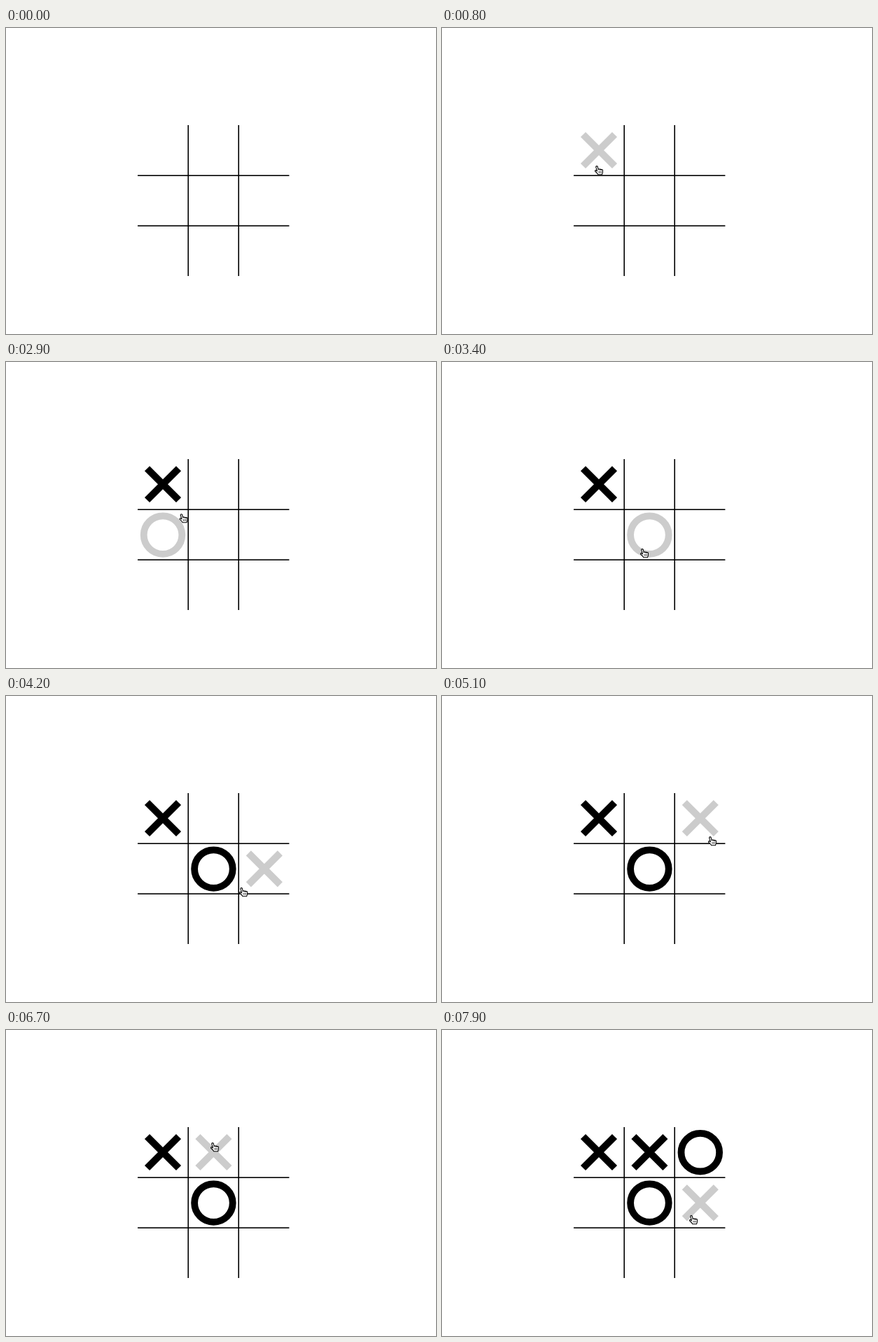
Recreate the animation shown at these times as an HTML page with a canvas. Size 614 by 438 pixels, loop 8000 ms.

```html
<!DOCTYPE html>
<html lang="en">
<head>
<meta charset="utf-8">
<title>Noughts and crosses</title>
<style>
  html, body { margin: 0; width: 100%; height: 100%; overflow: hidden; background: #fff; }
  canvas { display: block; width: 614px; height: 438px; }
</style>
</head>
<body>
<canvas id="stage" width="614" height="438"></canvas>
<script>
const ctx = document.getElementById('stage').getContext('2d');
const LOOP = 8000, STEP = 100;
const LEFT = 188, TOP = 139, CELL = 72;

// Pointer glides: start and end time, destination, optional bend of the curve
const entry = { x: 370, y: 246 };
const glides = [
  { from: 400, to: 800, x: 221, y: 198, bend: { x: 228, y: 250 } },
  { from: 800, to: 1200, x: 220, y: 188 },
  { from: 2000, to: 2200, x: 234, y: 195 },
  { from: 2600, to: 3400, x: 286, y: 268 },
  { from: 3700, to: 4600, x: 372, y: 280 },
  { from: 4600, to: 5400, x: 388, y: 166 },
  { from: 5600, to: 6000, x: 364, y: 306 },
  { from: 6200, to: 6700, x: 295, y: 162, bend: { x: 372, y: 180 } },
  { from: 6800, to: 7400, x: 366, y: 178 },
  { from: 7600, to: 7900, x: 356, y: 266 }
];

// Crosses and noughts take turns
const moves = [
  { at: 2100, col: 0, row: 0 },
  { at: 3800, col: 1, row: 1 },
  { at: 6900, col: 1, row: 0 },
  { at: 7700, col: 2, row: 0 }
];

const ease = k => k * k * (3 - 2 * k);
const mix = (a, b, k) => a + (b - a) * k;
const mixPoint = (a, b, k) => ({ x: mix(a.x, b.x, k), y: mix(a.y, b.y, k) });

function pointerAt(t) {
  if (t < glides[0].from) return null;
  let pos = entry;
  for (const g of glides) {
    if (t < g.from) break;
    const k = ease(Math.min(1, (t - g.from) / (g.to - g.from)));
    pos = g.bend
      ? mixPoint(mixPoint(pos, g.bend, k), mixPoint(g.bend, g, k), k)
      : mixPoint(pos, g, k);
  }
  return pos;
}

function drawGrid() {
  ctx.fillStyle = '#000';
  for (const i of [1, 2]) {
    ctx.fillRect(LEFT + CELL * i - 0.6, TOP, 1.6, CELL * 3);
    ctx.fillRect(LEFT, TOP + CELL * i - 0.6, CELL * 3 + 0.4, 1.6);
  }
}

function drawMark(isCross, col, row, color) {
  const x = 224 + col * 72.4, y = 175 + row * 72.4, arm = 22.5;
  ctx.strokeStyle = color;
  ctx.lineWidth = isCross ? 10 : 9.8;
  ctx.beginPath();
  if (isCross) {
    for (const s of [-1, 1]) {
      ctx.moveTo(x - arm, y - arm * s);
      ctx.lineTo(x + arm, y + arm * s);
    }
  } else {
    ctx.arc(x, y + 0.2, 27.3, 0, Math.PI * 2);
  }
  ctx.stroke();
}

// The fingertip is at the given point
function drawHand({ x, y }) {
  ctx.save();
  ctx.translate(x, y);
  ctx.lineJoin = 'round';
  ctx.strokeStyle = '#000';
  ctx.fillStyle = '#fff';
  ctx.lineWidth = 1.1;
  ctx.beginPath();
  ctx.moveTo(1.8, 11.7);
  ctx.quadraticCurveTo(0.6, 9.6, -2.4, 7);
  ctx.quadraticCurveTo(-2.6, 5.2, -0.9, 5.7);
  ctx.lineTo(0.5, 6.8);
  ctx.arc(0, 0.9, 1.3, Math.PI, 0);
  for (let i = 0; i < 3; i++) {
    ctx.arc(3.4 + 2 * i, 4.8 + 0.4 * i, 1.1, Math.PI, 0);
  }
  ctx.quadraticCurveTo(8.9, 8.6, 7.5, 11.7);
  ctx.closePath();
  ctx.fill();
  ctx.stroke();
  ctx.lineWidth = 0.7;
  ctx.beginPath();
  for (let i = 0; i < 3; i++) {
    ctx.moveTo(3 + 1.7 * i, 7);
    ctx.lineTo(3 + 1.7 * i, 9.6);
  }
  ctx.stroke();
  ctx.restore();
}

function draw(t) {
  ctx.fillStyle = '#fff';
  ctx.fillRect(0, 0, 614, 438);
  const made = moves.filter(m => m.at <= t);
  const pointer = pointerAt(t);
  if (pointer) {
    const col = Math.floor((pointer.x - LEFT) / CELL);
    const row = Math.floor((pointer.y - TOP) / CELL);
    const taken = made.some(m => m.col === col && m.row === row);
    if (!taken) drawMark(made.length % 2 === 0, col, row, '#ccc');
  }
  made.forEach((m, i) => drawMark(i % 2 === 0, m.col, m.row, '#000'));
  drawGrid();
  if (pointer) drawHand(pointer);
}

const start = performance.now();
function tick() {
  const t = (performance.now() - start) % LOOP;
  draw(Math.floor(t / STEP) * STEP);
  requestAnimationFrame(tick);
}
tick();
</script>
</body>
</html>
```
